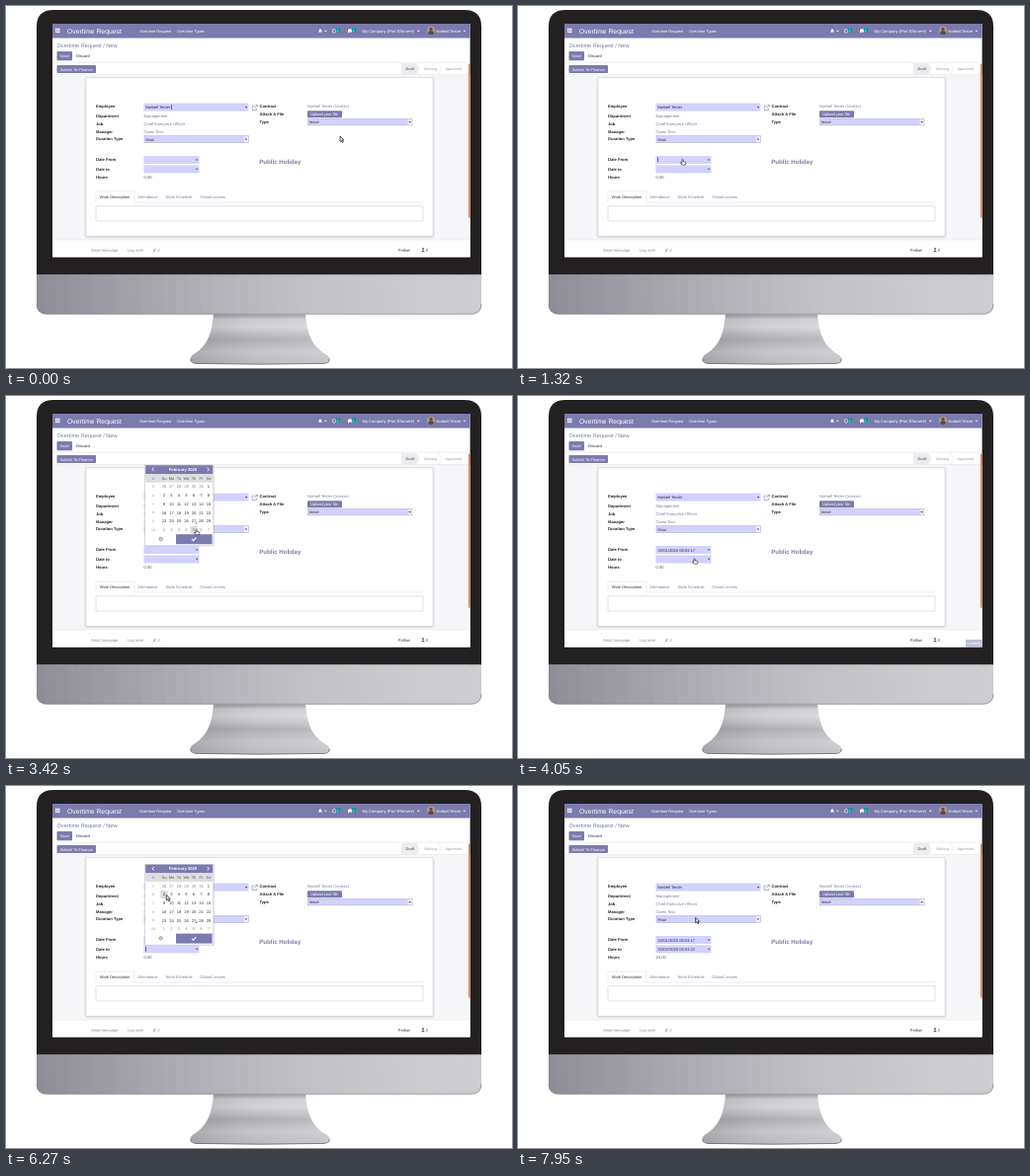
An HTML page for the animation above (8000 ms loop, 512 px wide and 367 px high).

```html
<!DOCTYPE html>
<html lang="en">
<head>
<meta charset="utf-8">
<title>Overtime request form</title>
<style>
html, body { margin: 0; width: 100%; height: 100%; overflow: hidden; background: #fff; }
svg { display: block; width: 100vw; height: 100vh; }
text { font-family: "Liberation Sans", Arial, sans-serif; text-rendering: geometricPrecision; white-space: pre; }
</style>
</head>
<body>
<svg id="stage" viewBox="0 0 512 367">
  <defs>
    <linearGradient id="neck" x2="0" y2="1">
      <stop offset="0" stop-color="#8c8c91"/><stop offset=".1" stop-color="#c6c6cb"/>
      <stop offset=".25" stop-color="#cfcfd4"/><stop offset=".5" stop-color="#a6a6ac"/>
      <stop offset=".75" stop-color="#c0c0c5"/><stop offset="1" stop-color="#b2b2b8"/>
    </linearGradient>
    <linearGradient id="shine">
      <stop offset="0" stop-color="#55555a" stop-opacity=".2"/>
      <stop offset=".55" stop-color="#fff" stop-opacity=".12"/>
      <stop offset="1" stop-color="#fff" stop-opacity=".25"/>
    </linearGradient>
    <filter id="soft" x="-10%" y="-10%" width="120%" height="120%"><feGaussianBlur stdDeviation="1.8"/></filter>
    <clipPath id="screen"><rect x="47" y="18" width="422.6" height="236.6"/></clipPath>
    <clipPath id="chin"><path d="M31 272.5H481V302Q481 312.3 470 312.3H42Q31 312.3 31 302Z"/></clipPath>
  </defs>
  <g id="monitor"></g>
  <g clip-path="url(#screen)">
    <g id="page"></g>
    <text id="from" x="141.5" y="157.6" font-size="4.1" fill="#333">02/01/2020 08:53:17</text>
    <text id="to" x="141.5" y="167" font-size="4.1" fill="#333">02/02/2020 08:53:22</text>
    <text id="hours" x="139.5" y="175.3" font-size="4.1" fill="#555"></text>
    <rect id="caret" width=".6" height="5" fill="#222"/>
    <g id="calendar"></g>
    <g id="loading">
      <rect x="453" y="247" width="17" height="8" fill="#7c7bad"/>
      <text x="454.5" y="252.4" font-size="3.8" fill="#fff">Loading</text>
    </g>
    <path id="arrow" d="M0 0V5.4L1.3 4.3L2.3 6.4L3.3 5.9L2.3 3.9H4Z" fill="#eee" stroke="#222" stroke-width=".75"/>
    <path id="hand" d="M-.5 .4Q0 -.5 .6 .4V2.3L3 2.9Q3.6 3 3.4 4L2.9 5.6H-.4L-2.2 3.5Q-1.9 2.7 -.5 3.8Z" fill="#fff" stroke="#222" stroke-width=".65"/>
  </g>
</svg>
<script>
const $ = id => document.getElementById(id);
const PURPLE = '#7c7bad', FIELD = '#d2d2ff', DARK = '#333', GREY = '#8e8e98';
const USER = 'Norbell Tester';

const rect = (x, y, w, h, fill, extra = '') =>
  `<rect x="${x}" y="${y}" width="${w}" height="${h}" fill="${fill}" ${extra}/>`;
const path = (d, fill, extra = '') => `<path d="${d}" fill="${fill}" ${extra}/>`;
const label = (x, y, s, fill = PURPLE, size = 4.1, extra = '') =>
  `<text x="${x}" y="${y}" font-size="${size}" fill="${fill}" ${extra}>${s}</text>`;
const bold = (x, y, s, fill = '#222', size = 4.1, extra = '') =>
  label(x, y, s, fill, size, 'font-weight="700" ' + extra);
const caretDown = (x, y, fill) => path(`M${x} ${y}h2.6l-1.3 1.5z`, fill);
const line = (d, stroke, width = .6) => path(d, 'none', `stroke="${stroke}" stroke-width="${width}"`);
const button = (x, y, w, h, s, tx) =>
  rect(x, y, w, h, PURPLE, 'rx=".7"') + label(tx, y + h / 2 + 1.5, s, '#fff', 4);
const select = (x, y, w, h, s, native) =>
  rect(x, y, w, h, FIELD, native ? 'stroke="#a9a9bd" stroke-width=".5"' : '') +
  (native ? rect(x + w - 4.4, y + .4, 4, h - .8, '#efeff6') : '') +
  label(x + 1.5, y + h / 2 + 1.4, s, DARK) + caretDown(x + w - 3.7, y + h / 2 - .6, '#444');

function drawMonitor() {
  const base = 'M210 312.5H303C305 333 309 345 325 354Q332 360 322 362.4Q257 364 192 362.4Q183 360 188.5 354C204 345 208 333 210 312.5Z';
  let s = path('M31 274V21Q31 4 48 4H464Q481 4 481 21V274Z', '#222021');
  let bands = '';
  for (let i = 0; i < 38; i++) {
    const x = 25 + i * 12.2;
    const lightness = 57 + 24 * Math.sin(i / 37 * Math.PI / 2);
    bands += path(`M${x} 272H${x + 13}L${x + 15} 313H${x + 2}Z`, `hsl(245 4% ${lightness}%)`);
  }
  s += `<g clip-path="url(#chin)">${rect(31, 272, 450, 41, '#c8c8cd')}${bands}</g>`;
  return s + line('M31 302Q31 312.3 42 312.3H470Q481 312.3 481 302', '#77777c', .6) +
    path(base, 'url(#neck)') + path(base, 'url(#shine)') +
    line('M187 358Q186 361.6 192 362.4Q257 364 322 362.4Q328 361.6 327 358', '#66666b', .8);
}

function drawHeader() {
  let s = rect(47, 18, 423, 14.5, PURPLE);
  for (let i = 0; i < 9; i++) s += rect(50 + i % 3 * 1.6, 22.6 + (i / 3 | 0) * 1.6, 1.3, 1.3, '#fff');
  s += label(62, 27.6, 'Overtime Request', '#fff', 6.8) +
    label(135, 26.6, 'Overtime Request', '#fff', 4) + label(173, 26.6, 'Overtime Types', '#fff', 4) +
    path('M316 26.6Q316.8 26 316.8 24.5Q318 22 319.2 24.5Q319.2 26 320 26.6Z', '#fff') +
    caretDown(322, 24.7, '#fff') +
    '<circle cx="332" cy="25.3" r="1.8" fill="none" stroke="#fff" stroke-width=".6"/>' +
    path('M346 24Q348 22.4 350.3 24V26.4H347.4L346 27.6Z', '#fff');
  for (const x of [336, 352])
    s += `<circle cx="${x}" cy="24.4" r="2.3" fill="#00a09d"/>` + label(x - .9, 25.5, '1', '#fff', 3);
  return s + label(360.5, 26.6, 'My Company (Port Ellsmere)', '#fff') + caretDown(416, 24.7, '#fff') +
    '<circle cx="430" cy="24.8" r="4" fill="#b59a88"/>' +
    path('M427 28Q427.4 25 430 25Q432.6 25 433 28Q430 30 427 28Z', '#5b4a4a') +
    '<circle cx="430" cy="23.4" r="1.7" fill="#6a4a3c"/>' +
    label(435.6, 26.6, USER, '#fff', 4) + caretDown(462.5, 24.7, '#fff');
}

function drawControls() {
  return label(51.5, 41.6, 'Overtime Request <tspan fill="#77778f">/ New</tspan>', PURPLE, 5.6) +
    button(51.5, 46, 15.5, 9.3, 'Save', 54.5) + label(71, 52.2, 'Discard', DARK) +
    line('M47 57.1H470M47 69.6H470', '#dcdce2', .5) +
    button(51.5, 60, 39.5, 8, 'Submit To Finance', 54.7) +
    path('M400 58H415.5L418.5 63.8L415.5 69.4H400Z', '#ececf0') +
    line('M438 58L441 63.8L438 69.4', '#dcdce2', .5) +
    bold(404.5, 65.3, 'Draft', '#777', 3.9) +
    label(423, 65.3, 'Waiting', '#a0a0a8', 3.9) + label(444.5, 65.3, 'Approved', '#a0a0a8', 3.9);
}

function drawForm() {
  let s = rect(47, 70, 423, 167, '#f6f6f9') +
    rect(81, 74, 351, 160, '#8f8f9c', 'opacity=".55" filter="url(#soft)"') +
    rect(81, 72.6, 351, 160.6, '#fff', 'stroke="#d3d3da" stroke-width=".6"');
  const rows = [['Employee', 91, 103.2], ['Department', 91, 113.3], ['Job', 91, 121.1], ['Manager', 91, 129],
    ['Duration Type', 91, 136.3], ['Date From', 91, 157.2], ['Date to', 91, 166.5], ['Hours', 91, 175.3],
    ['Contract', 256.5, 103.2], ['Attach A File', 256.5, 110.7], ['Type', 256.5, 119]];
  for (const [name, x, y] of rows) s += bold(x, y, name);
  s += select(139.5, 98.6, 106, 8, USER) +
    label(139.5, 113.3, 'Management') + label(139.5, 121.1, 'Chief Executive Officer') +
    label(139.5, 129, 'Owen Test') + select(140, 131.7, 105.3, 6.9, 'Hour', true) +
    select(139.5, 152, 56, 8, '') + select(139.5, 161.4, 56, 8, '') +
    line('M251.6 101.2H249.2V105.6H253.4V103.8M251.2 103.6L254.4 100.4M252.4 100.4H254.4V102.4', '#6f6f88', .55) +
    label(305, 103.2, USER + ' Contract') + button(305, 106.2, 35, 7, 'Upload your file', 308) +
    select(305.5, 114.5, 105.5, 6.4, 'leave', true) +
    bold(256.3, 160.4, 'Public Holiday', PURPLE, 6.1);
  return s + line('M91 199H91V188H129.7V199H422', '#d8d8df', .5) +
    label(94.8, 194.5, 'Work Description', DARK, 4) + label(133.3, 194.5, 'Attendance', PURPLE, 4) +
    label(161.5, 194.5, 'Work Schedule', PURPLE, 4) + label(196.3, 194.5, 'Global Leaves', PURPLE, 4) +
    rect(91, 202.8, 331, 15.2, '#fff', 'rx="1" stroke="#cfcfd8" stroke-width=".6"');
}

function drawFooter() {
  return rect(47, 237, 423, 18, '#fff') + line('M47 237H470', '#e0e0e6', .5) +
    label(86, 249, 'Send message', GREY) + label(123, 249, 'Log note', GREY) +
    line('M151.4 246.4L150 249.4Q149.2 249.4 149.6 248L150.8 245.6', GREY, .6) + label(153.5, 249, '0', GREY) +
    label(397, 249, 'Follow', DARK) +
    '<circle cx="422" cy="246.2" r="1" fill="#55556f"/>' + path('M420.2 249.3Q422 245.8 423.8 249.3Z', '#55556f') +
    label(424.7, 249, '0', '#55556f') + rect(468.2, 58.6, 1.6, 156, '#d2602f');
}

const column = i => 160 + i * 7.5;
const rowY = r => 92 + r * 8.7;

function drawCalendar() {
  const mid = 'text-anchor="middle"';
  let s = rect(139.8, 69.8, 71, 82.5, '#77778a', 'opacity=".25"') +
    rect(140.6, 70, 69.2, 81.6, '#fff', 'stroke="#c9c9d2" stroke-width=".5"') +
    rect(141.2, 70.2, 68, 8.8, PURPLE) + rect(141.2, 79, 68, 8.6, '#dedee2') +
    line('M149.6 72.6L148 74.4L149.6 76.2M203.8 72.6L205.4 74.4L203.8 76.2', '#fff', 1) +
    bold(179, 75.9, 'February 2020', '#fff', 4.2, mid) + label(149, 84.7, '#', '#777', 3.8, mid) +
    rect(0, 0, 7.4, 8, '#dcdce0', 'id="hover" rx=".8"');
  'Su Mo Tu We Th Fr Sa'.split(' ').forEach((d, i) => s += label(column(i), 84.7, d, '#555', 4, mid));
  for (let r = 0; r < 6; r++) {
    s += label(149, rowY(r) + 1.3, r + 5, '#999', 3.4, mid);
    for (let c = 0; c < 7; c++) {
      const n = r * 7 + c - 5;
      const inMonth = n > 0 && n < 30;
      s += label(column(c), rowY(r) + 1.4, n < 1 ? n + 31 : n > 29 ? n - 29 : n, inMonth ? '#333' : '#888', 4.1, mid);
    }
  }
  return s + path('M193.4 129.5V127.2L191.2 129.5Z', PURPLE) +
    rect(172, 140.2, 36.6, 10, PURPLE) + line('M188 145.2L189.6 146.7L192.4 143.6', '#fff', 1.1) +
    '<circle cx="156.7" cy="145" r="1.7" fill="none" stroke="#55556f" stroke-width=".6"/>' +
    line('M156.7 143.9V145.2H157.6', '#55556f', .4);
}

$('monitor').innerHTML = drawMonitor();
$('page').innerHTML = rect(47, 17, 423, 238, '#fff') + drawHeader() + drawControls() + drawForm() + drawFooter();
$('calendar').innerHTML = drawCalendar();

// time, x, y, pointer shape from that time on
const moves = [
  [0, 338, 132, 'arrow'], [810, 327, 149, 'arrow'], [1170, 176, 186, 'arrow'], [1310, 176, 186, 'arrow'],
  [1320, 166.5, 155.4, 'hand'], [1500, 166.5, 155.4, 'hand'], [2010, 196, 126, 'hand'],
  [2160, 196, 126, 'arrow'], [2430, 214, 92.5, 'arrow'], [2700, 205, 91.5, 'hand'],
  [3000, 205, 91.5, 'hand'], [3570, 190, 144, 'hand'], [3780, 190, 144, 'hand'],
  [4050, 178.5, 164.6, 'hand'], [4650, 178.5, 164.6, 'hand'], [5160, 169.3, 109.8, 'hand'],
  [5250, 169.3, 109.8, 'hand'], [5490, 167, 110, 'hand'], [5700, 167, 110, 'hand'],
  [5880, 162.3, 110.5, 'arrow'], [6270, 162.3, 110.5, 'arrow'], [6300, 164, 113, 'hand'],
  [6660, 190, 153.5, 'hand'], [6870, 190, 153.5, 'hand'], [7020, 188, 150, 'arrow'],
  [7590, 179.6, 133.4, 'arrow'], [8000, 179.6, 133.4, 'arrow']
];

const within = (t, a, b) => t >= a && t < b;
const show = (id, on) => $(id).setAttribute('visibility', on ? 'visible' : 'hidden');

function pointer(t) {
  const i = moves.findIndex(m => m[0] > t) - 1;
  const [t0, x0, y0, shape] = moves[i], [t1, x1, y1] = moves[i + 1];
  const p = (t - t0) / (t1 - t0), e = p * p * (3 - 2 * p);
  return { x: x0 + (x1 - x0) * e, y: y0 + (y1 - y0) * e, shape };
}

function drawCaret(t) {
  const inUser = within(t, 0, 600);
  const inFrom = within(t, 1320, 1920) || within(t, 2520, 3120);
  const inTo = within(t, 4650, 5250) || within(t, 6270, 6840);
  show('caret', inUser || inFrom || inTo);
  $('caret').setAttribute('x', inUser ? 167.3 : 141);
  $('caret').setAttribute('y', inUser ? 100 : inFrom ? 153.4 : 162.8);
}

function drawHover(x, y, open) {
  const c = Math.round((x - 160) / 7.5), r = Math.round((y + 1 - 92) / 8.7);
  show('hover', open && c >= 0 && c < 7 && r >= 0 && r < 6);
  $('hover').setAttribute('x', column(c) - 3.7);
  $('hover').setAttribute('y', rowY(r) - 4);
}

function loadingAlpha(t) {
  const age = t > 6000 ? t - 6870 : t - 3810;
  return age < 0 ? 0 : Math.max(0, Math.min(1, 1 - (age - 120) / 240));
}

function render(t) {
  const { x, y, shape } = pointer(t);
  for (const id of ['arrow', 'hand']) {
    show(id, id === shape);
    $(id).setAttribute('transform', `translate(${x} ${y})`);
  }
  const second = within(t, 4650, 6840);
  const open = within(t, 1350, 3780) || second;
  const shift = second ? 9.4 : 0;
  show('calendar', open);
  $('calendar').setAttribute('transform', `translate(0 ${shift})`);
  drawHover(x, y - shift, open);
  show('from', t >= 3780);
  show('to', t >= 6840);
  $('hours').textContent = t >= 6900 ? '24.00' : '0.00';
  $('loading').setAttribute('opacity', loadingAlpha(t));
  drawCaret(t);
}

function tick() {
  render(performance.now() % 8000);
  requestAnimationFrame(tick);
}
tick();
</script>
</body>
</html>
```
